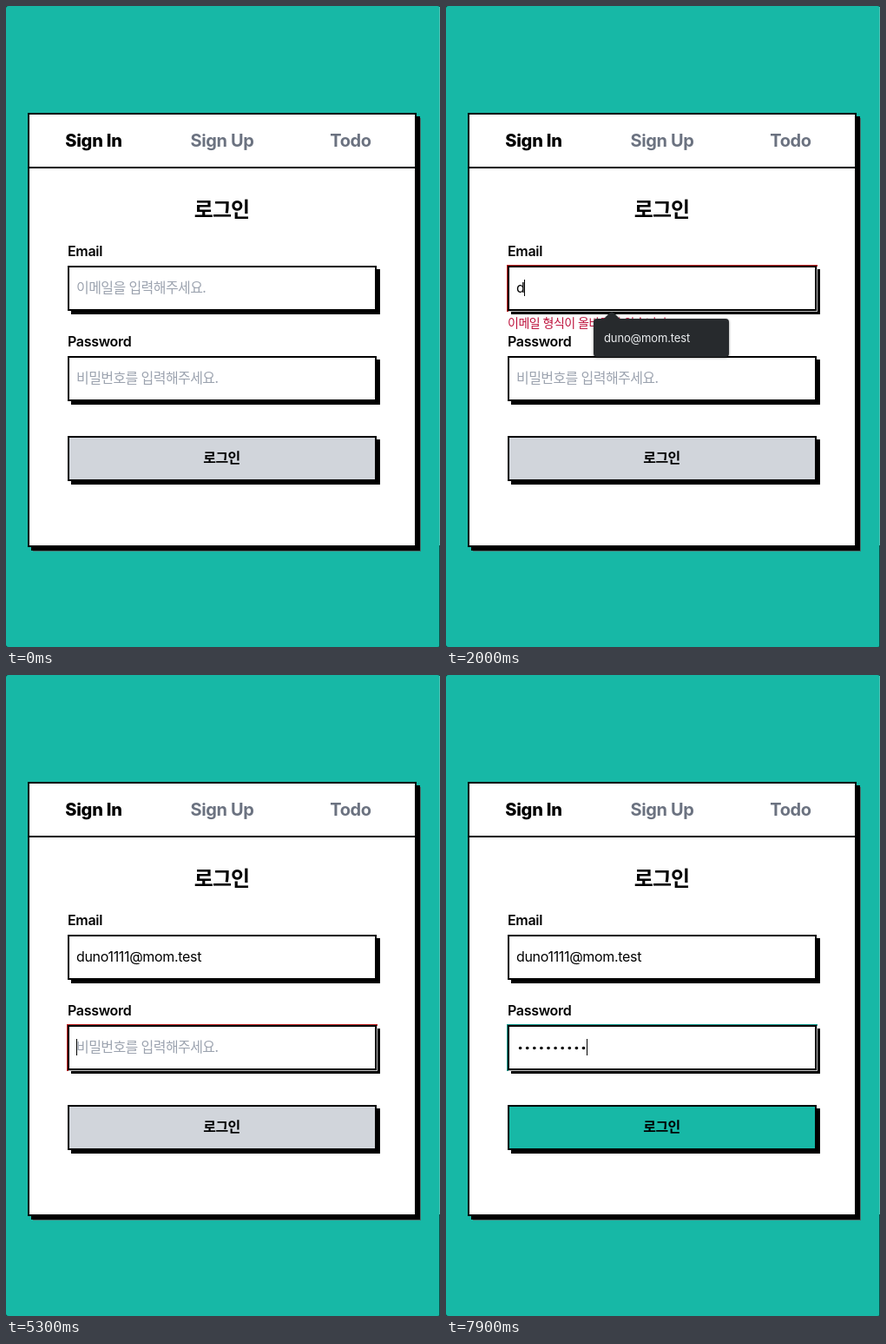
Animation of 500x738 px, one loop 8 s. Source, as an HTML page:

```html
<!DOCTYPE html>
<html lang="ko">
<head>
<meta charset="utf-8">
<title>로그인</title>
<style>
html, body { margin: 0; width: 100%; height: 100%; overflow: hidden; background: #0d3f3a; }
svg { display: block; }
text { font: 400 16px Inter, "Noto Sans CJK KR", sans-serif; letter-spacing: -.02em; white-space: pre; }
.ko { font-family: "Noto Sans CJK KR", "Noto Sans CJK", Inter, sans-serif; letter-spacing: -.036em; }
.mid { text-anchor: middle; }
.tab { font-size: 20px; font-weight: 700; fill: #6b7280; }
.tab.on { font-weight: 800; fill: #000; letter-spacing: -.01em; }
.title { font-size: 24px; font-weight: 600; }
.label { font-weight: 600; }
.hint { fill: #9ca3af; }
.error { font-size: 14px; font-weight: 500; fill: #be123c; }
.menu text { font-size: 13px; fill: #eceef0; letter-spacing: -.01em; }
.menu { filter: drop-shadow(0 1px 1.5px rgba(0, 0, 0, .45)); }
</style>
</head>
<body>
<svg id="stage" width="500" height="738" viewBox="0 0 500 738">
  <rect width="500" height="738" rx="3" fill="#17b8a6"/>
  <rect x="499" y="1" width="1" height="620" fill="#4fc4b6"/>
  <rect x="499" y="621" width="1" height="117" fill="#0b4f48"/>

  <rect x="31" y="129" width="447" height="499" fill="#4d6f6b"/>
  <rect x="29" y="127" width="448" height="500"/>
  <rect x="26" y="124" width="446" height="498" fill="#fff" stroke="#000" stroke-width="2"/>
  <rect x="26" y="185" width="446" height="2"/>

  <text class="tab on mid" x="101" y="162">Sign In</text>
  <text class="tab mid" x="249" y="162">Sign Up</text>
  <text class="tab mid" x="397" y="162">Todo</text>
  <text class="ko title mid" x="248.5" y="243">로그인</text>
  <text class="label" x="71" y="288">Email</text>
  <text class="label" x="71" y="392">Password</text>
</svg>
<script>
const LOOP = 8000;
const RED = '#b91c1c', GREEN = '#0d9488', GREY = '#d1d5db';
const EMAIL = 'duno1111@mom.test';
const SAVED = ['duno@mom.test', 'kkk@kkk.kkk', 'qwer@dun.test', 'demo@dun.test', 'kkdkhhj@kkdkd', '5667568@'];

// Time of each key press
const emailKeys = [2000, 2100, 2200, 2400, 2900, 3000, 3200, 3300, 3800,
  4300, 4400, 4500, 4600, 4800, 4900, 5000, 5100];
const passKeys = [6400, 6500, 6700, 6700, 6800, 7100, 7100, 7300, 7300, 7400];

const stage = document.getElementById('stage');

function add(tag, attrs, parent = stage, text = '') {
  const el = document.createElementNS('http://www.w3.org/2000/svg', tag);
  for (const key in attrs) el.setAttribute(key, attrs[key]);
  el.textContent = text;
  parent.append(el);
  return el;
}

function show(el, on) {
  el.style.display = on ? '' : 'none';
}

function rect(x, y, width, height, fill, parent) {
  return add('rect', { x, y, width, height, fill }, parent);
}

function box(y, fill) {
  rect(75, y + 4, 356, 52, '#000');
  const ring = add('g', {});
  const edge = rect(70, y - 1, 358, 54, RED, ring);
  rect(72, y + 1, 356, 52, '#c4c4c4', ring);
  const face = add('rect', { x: 72, y: y + 1, width: 354, height: 50, fill, stroke: '#000', 'stroke-width': 2 });
  return { ring, edge, face };
}

function field(y, hint, error) {
  const parts = box(y, '#fff');
  parts.hint = add('text', { class: 'ko hint', x: 81, y: y + 31 }, stage, hint);
  parts.error = add('text', { class: 'ko error', x: 71, y: y + 71 }, stage, error);
  parts.value = add('text', { x: 81, y: y + 31 });
  parts.caret = rect(81, y + 16, 1, 19, '#000');
  return parts;
}

const email = field(299, '이메일을 입력해주세요.', '이메일 형식이 올바르지 않습니다.');
const pass = field(403, '비밀번호를 입력해주세요.', '비밀번호는 8자 이상이어야 합니다.');
const dots = passKeys.map((_, i) => add('circle', { cx: 85.6 + 8.1 * i, cy: 429.5, r: 1.8 }));

const button = box(495, GREY);
show(button.ring, false);
add('text', { class: 'ko label mid', x: 248.5, y: 526 }, stage, '로그인');

const menu = add('g', { class: 'menu' });
add('path', { d: 'M181 361 L189.5 352.6 Q191 351.4 192.5 352.6 L201 361 Z', fill: '#272a2d' }, menu);
const panel = add('rect', { x: 170, y: 360, width: 156, rx: 4, fill: '#272a2d' }, menu);
const rows = SAVED.map((name, i) => add('text', { x: 182, y: 387 + 36 * i }, menu, name));

const within = (t, from, to) => t >= from && t < to;
const pressed = (keys, t) => keys.filter(k => k <= t).length;

function update(parts, count, focused, valid, caretOn) {
  show(parts.hint, !count);
  show(parts.error, count && !valid);
  show(parts.ring, focused);
  parts.edge.setAttribute('fill', valid ? GREEN : RED);
  show(parts.caret, caretOn);
}

function draw(t) {
  const typed = pressed(emailKeys, t);
  update(email, typed, within(t, 1300, 5300), t >= 4100,
    within(t, 1300, 1800) || within(t, 2000, 5300));
  email.value.textContent = EMAIL.slice(0, typed);
  const width = typed ? email.value.getComputedTextLength() : 0;
  email.caret.setAttribute('x', Math.round(81 + width));

  const count = pressed(passKeys, t);
  update(pass, count, t >= 5300, t >= 7800, within(t, 5300, 5800) || t >= 6300);
  dots.forEach((dot, i) => show(dot, i < count));
  pass.caret.setAttribute('x', Math.round(81 + 8.1 * count));

  const fill = t < 7800 ? GREY : t < 7900 ? '#74c7c1' : '#17b8a6';
  button.face.setAttribute('fill', fill);

  // The saved addresses narrow to the one that matches the typed text
  const listed = typed ? 1 : SAVED.length;
  show(menu, within(t, 1300, 2900));
  panel.setAttribute('height', 8 + 36 * listed);
  rows.forEach((row, i) => show(row, i < listed));
}

const start = performance.now();
function tick() {
  draw((performance.now() - start) % LOOP);
  requestAnimationFrame(tick);
}
tick();
</script>
</body>
</html>
```
